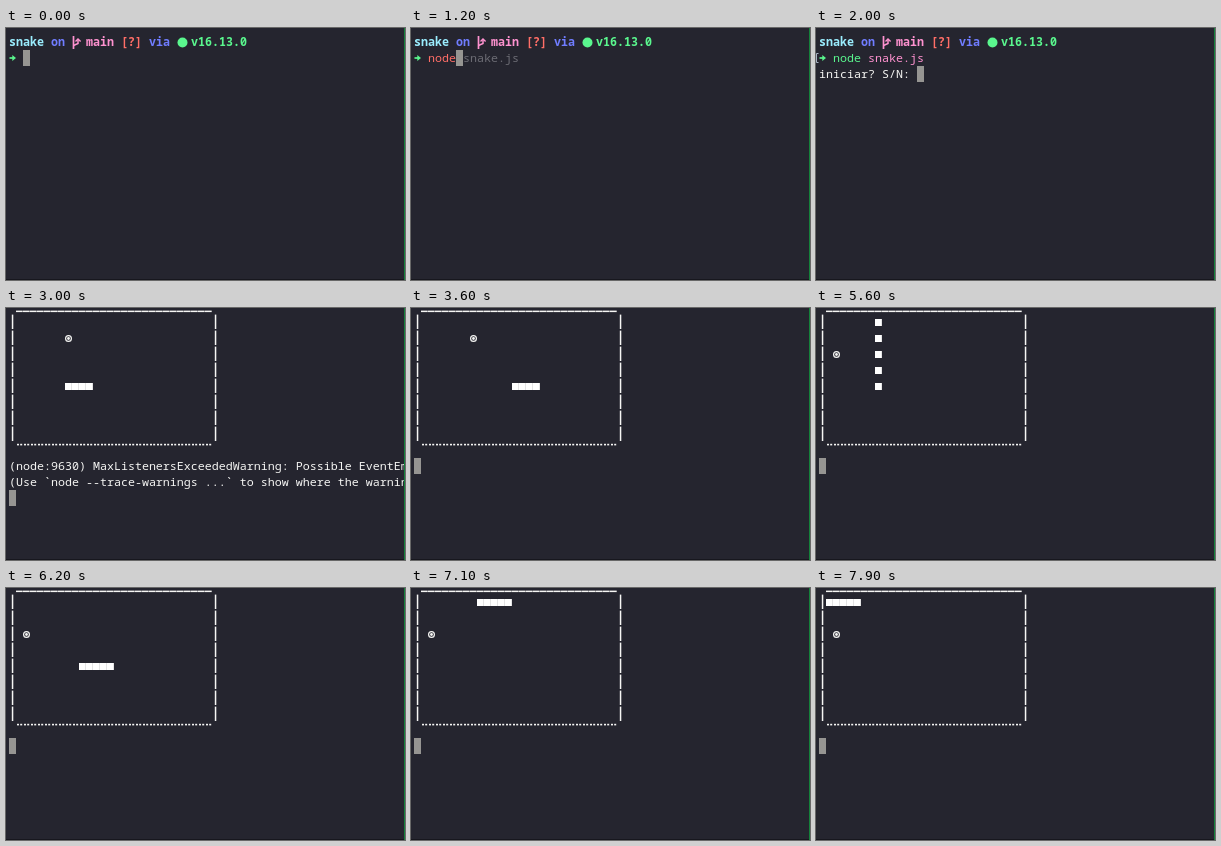
An HTML page with a canvas that plays this animation: 399x252 px, repeating every 8000 ms.

```html
<!DOCTYPE html>
<html lang="pt">
<head>
<meta charset="utf-8">
<title>Snake in the terminal</title>
<style>
  html, body { margin: 0; width: 100%; height: 100%; overflow: hidden; background: #25252f; }
  canvas { display: block; }
</style>
</head>
<body>
<canvas id="stage" width="399" height="252"></canvas>
<script>
const ctx = document.getElementById('stage').getContext('2d');
const LOOP = 8000, TICK = 100;
const CW = 7, LH = 16, LEFT = 3, TOP = 6;
const C = {
  bg: '#25252f', white: '#f6f6f4', cyan: '#9aedfe', blue: '#707dff', pink: '#ff92d0',
  red: '#ff6e67', green: '#5af78e', dim: '#6c6c74', cursor: '#969592'
};

const colX = c => LEFT + c * CW;
const rowY = r => TOP + r * LH;

function rect(color, x, y, w, h) {
  ctx.fillStyle = color;
  ctx.fillRect(x, y, w, h);
}

function text(str, col, row, color, weight = 500) {
  ctx.font = `${weight} 11.667px "Noto Sans Mono", "DejaVu Sans Mono", monospace`;
  ctx.fillStyle = color;
  ctx.fillText(str, colX(col), rowY(row) + 12);
}

function cursor(col, row) {
  rect(C.cursor, colX(col), rowY(row), CW, LH);
}

function stroke(color, width, points) {
  ctx.strokeStyle = color;
  ctx.lineWidth = width;
  ctx.beginPath();
  points.forEach(([x, y], i) => i ? ctx.lineTo(x, y) : ctx.moveTo(x, y));
  ctx.stroke();
}

function disc(color, x, y, r) {
  ctx.fillStyle = color;
  ctx.beginPath();
  ctx.arc(x, y, r, 0, Math.PI * 2);
  ctx.fill();
}

function branchIcon() {
  stroke(C.pink, 1.7, [[67.5, 8], [67.5, 21]]);
  stroke(C.pink, 1.5, [[67.5, 17.5], [72, 15.5], [72, 11.5]]);
  stroke(C.pink, 1.4, [[69.5, 13.5], [72, 11], [74.6, 13.5]]);
}

function promptArrow() {
  stroke(C.green, 1.7, [[3.5, 30], [7, 30]]);
  ctx.fillStyle = C.green;
  ctx.beginPath();
  ctx.moveTo(6.3, 27);
  ctx.lineTo(10, 30);
  ctx.lineTo(6.3, 33);
  ctx.fill();
}

function drawPrompt() {
  text('snake', 0, 0, C.cyan, 700);
  text('on', 6, 0, C.blue, 700);
  branchIcon();
  text('main', 11, 0, C.pink, 700);
  text('[?]', 16, 0, C.red, 700);
  text('via', 20, 0, C.blue, 700);
  disc(C.green, 176.5, 14.5, 5);
  text('v16.13.0', 26, 0, C.green, 700);
  promptArrow();
}

// Typed keys, with the rest of the command offered as a dim suggestion
function drawCommand(t) {
  const cmd = 'node snake.js';
  if (t >= 1600) {
    text('node', 2, 1, C.green);
    text('snake.js', 7, 1, C.pink);
    if (t < 1800) cursor(15, 1);
    return;
  }
  const n = [400, 800, 1000, 1200].filter(k => t >= k).length;
  cursor(2 + n, 1);
  if (!n) return;
  text(cmd.slice(0, n), 2, 1, t >= 1300 ? C.green : C.red);
  text(cmd[n], 2 + n, 1, C.bg);
  text(cmd.slice(n + 1), 3 + n, 1, C.dim);
}

function drawQuestion(t) {
  stroke('#a9b4c4', 1, [[2.5, 25.5], [0.5, 25.5], [0.5, 34.5], [2.5, 34.5]]);
  if (t < 1900) return cursor(0, 2);
  text('iniciar? S/N: ', 0, 2, C.white);
  const typed = t >= 2600;
  if (typed) text('s', 14, 2, C.white);
  cursor(typed ? 15 : 14, 2);
}

// Cells visited by the snake, expanded from its turning points
const turns = [[7, 4], [18, 4], [18, 0], [8, 0], [8, 4], [14, 4], [14, 0], [1, 0]];
const path = [turns[0]];
for (const [tx, ty] of turns.slice(1)) {
  let [x, y] = path[path.length - 1];
  while (x !== tx || y !== ty) {
    x += Math.sign(tx - x);
    y += Math.sign(ty - y);
    path.push([x, y]);
  }
}
const EAT = path.findIndex(([x, y]) => x === 8 && y === 1);

function headIndex(t) {
  const k = Math.floor((t - 2900) / TICK);
  if (k === 4) return 6;
  return 3 + (k < 8 ? k : k - 1);
}

function drawBoard() {
  for (let i = 1; i <= 28; i++) {
    const x = colX(i);
    rect(C.white, x, 2.6, 6.7, 1.5);
    rect(C.white, x + 1, 135.8, 2, 1.6);
    rect(C.white, x + 4.2, 135.8, 2, 1.6);
  }
  for (let r = 0; r < 8; r++) {
    for (const c of [0, 29]) rect(C.white, colX(c) + 2.8, rowY(r) + 0.6, 1.5, 14.4);
  }
}

function drawFood([col, row]) {
  const x = colX(col) + 3.5, y = rowY(row) + 8.5;
  ctx.strokeStyle = C.white;
  ctx.lineWidth = 1.2;
  ctx.beginPath();
  ctx.arc(x, y, 2.9, 0, Math.PI * 2);
  ctx.stroke();
  disc(C.white, x, y, 1.4);
}

function drawGame(t) {
  const head = headIndex(t), fed = head >= EAT;
  drawBoard();
  drawFood(fed ? [2, 2] : [8, 1]);
  for (let i = head - (fed ? 4 : 3); i <= head; i++) {
    const x = colX(path[i][0]), y = rowY(path[i][1]) + 5;
    rect('#ffffff', x, y, CW, 7);
    rect('rgba(37,37,47,.25)', x + 6.5, y, 0.5, 7);
  }
  const warned = t >= 3000 && t < 3100;
  if (warned) {
    text('(node:9630) MaxListenersExceededWarning: Possible EventEmitter', 0, 9, C.white);
    text('(Use `node --trace-warnings ...` to show where the warning was', 0, 10, C.white);
  }
  cursor(0, warned ? 11 : 9);
}

function draw(t) {
  rect(C.bg, 0, 0, 399, 252);
  if (t < 2900) {
    drawPrompt();
    drawCommand(t);
    if (t >= 1800) drawQuestion(t);
  } else {
    drawGame(t);
  }
  rect('#17171e', 0, 251, 399, 1);
  rect('#14813a', 398, 0, 1, 252);
}

const start = performance.now();
function frame() {
  draw((performance.now() - start) % LOOP);
  requestAnimationFrame(frame);
}
frame();
</script>
</body>
</html>
```
